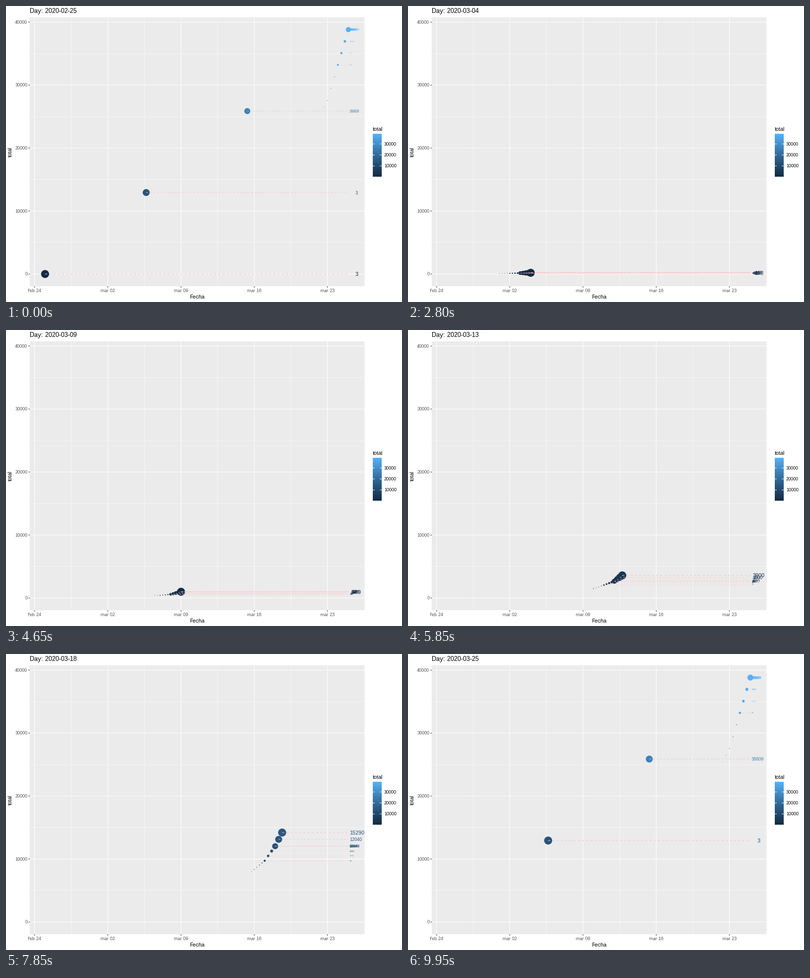
Animation of 800x600 px, one loop 10 s. Source, as a matplotlib script:

```python
import numpy as np
import matplotlib as mpl
import matplotlib.pyplot as plt
from matplotlib.animation import FuncAnimation
from matplotlib.collections import LineCollection
from matplotlib.patches import Rectangle

mpl.rcParams.update({
    "font.family": "Liberation Sans",
    "text.hinting": "default",
    "text.hinting_factor": 1,
    "lines.scale_dashes": False,
})

W, H, FRAMES, WAKE = 800, 600, 200, 20
LEFT, RIGHT, TOP, BOTTOM = 48.2, 724.5, 23, 568
DAY, LABEL_X = 21.13, 694
PT = 72.27 / 25.4

TOTALS = [3, 10, 18, 32, 45, 73, 114, 151, 198, 257,
          374, 430, 589, 999, 1501, 2060, 2677, 3900, 5232, 6948,
          8352, 9729, 12040, 15290, 17393, 21475, 24270, 27560, 33203, 38809]
LAST = len(TOTALS) - 1


def x_at(day):
    """Pixel column of a day counted from February 25."""
    return 78.9 + DAY * day


def y_at(total):
    return 543.3 - 0.012767 * total


# Colour gradient, mixed in CIE Lab
M = np.array([[0.4124, 0.3576, 0.1805],
              [0.2126, 0.7152, 0.0722],
              [0.0193, 0.1192, 0.9505]])
WHITE = M.sum(axis=1)


def to_lab(rgb):
    c = np.array(rgb) / 255
    lin = np.where(c > 0.04045, ((c + 0.055) / 1.055) ** 2.4, c / 12.92)
    t = M @ lin / WHITE
    x, y, z = np.where(t > 0.008856, np.cbrt(t), 7.787 * t + 16 / 116)
    return np.array([116 * y - 16, 500 * (x - y), 200 * (y - z)])


def to_rgb(lab):
    fy = (lab[0] + 16) / 116
    t = np.array([fy + lab[1] / 500, fy, fy - lab[2] / 200])
    xyz = np.where(t > 0.2069, t ** 3, (t - 16 / 116) / 7.787) * WHITE
    lin = np.clip(np.linalg.solve(M, xyz), 0, 1)
    c = np.where(lin > 0.0031308, 1.055 * lin ** (1 / 2.4) - 0.055, 12.92 * lin)
    return np.clip(c, 0, 1)


LOW, HIGH = to_lab((19, 43, 67)), to_lab((86, 177, 247))


def shade(total):
    u = (total - TOTALS[0]) / (TOTALS[-1] - TOTALS[0])
    return to_rgb(LOW + (HIGH - LOW) * u)


def day_name(i):
    return f"2020-02-{25 + i}" if i < 5 else f"2020-03-{i - 4:02d}"


def build_poses():
    """One (x, y, colour, label, title) per frame: hold a day, then glide on."""
    poses = []

    def add(i, nxt, u, title):
        total = TOTALS[i] + (TOTALS[nxt] - TOTALS[i]) * u
        label = str(TOTALS[i if u < 0.5 else nxt])
        poses.append((x_at(i + (nxt - i) * u), y_at(total), shade(total),
                      label, "Day: " + day_name(title)))

    for i in range(LAST + 1):
        nxt = (i + 1) % (LAST + 1)
        steps = 4 if i < 21 else 3
        for _ in range(3):
            add(i, i, 0, i)
        for j in range(1, steps + 1):
            add(i, nxt, j / steps, i if j <= (steps + 1) // 2 else nxt)
    return poses[:FRAMES]


poses = build_poses()

fig = plt.figure(figsize=(W / 72, H / 72), dpi=72, facecolor="white")
ax = fig.add_axes([0, 0, 1, 1])
ax.axis("off")


def rule(x0, y0, x1, y1, color="white", lw=1.07, z=1):
    ax.plot([x0, x1], [y0, y1], color=color, lw=lw, zorder=z,
            solid_capstyle="butt", snap=False)


def write(x, y, text, size, color="black", **kw):
    return ax.text(x, y, text, fontsize=size, color=color,
                   va=kw.pop("va", "baseline"), **kw)


# Panel, grid and axes
ax.add_patch(Rectangle((LEFT, TOP), RIGHT - LEFT, BOTTOM - TOP,
                       fc="#EBEBEB", ec="none", lw=0, zorder=0))
for k in range(5):
    x = x_at(7 * k - 1)
    rule(x + 3.5 * DAY, TOP, x + 3.5 * DAY, BOTTOM, lw=0.53)
    rule(x, TOP, x, BOTTOM)
    rule(x, BOTTOM, x, BOTTOM + 2.75, "#333333")
    name = ["feb 24", "mar 02", "mar 09", "mar 16", "mar 23"][k]
    write(x, 580, name, 8.8, "#4D4D4D", ha="center")

    y = y_at(10000 * k)
    if k < 4:
        rule(LEFT, y_at(10000 * k + 5000), RIGHT, y_at(10000 * k + 5000), lw=0.53)
    rule(LEFT, y, RIGHT, y)
    rule(LEFT - 2.75, y, LEFT, y, "#333333")
    write(43.2, y + 3.1, str(10000 * k), 8.8, "#4D4D4D", ha="right")

write((LEFT + RIGHT) / 2, 593, "Fecha", 11, ha="center")
write(9, (TOP + BOTTOM) / 2, "total", 11, rotation=90, ha="center", va="center")

# Colour legend
BAR_X, BAR_Y, BAR_W, BAR_H = 741.3, 260, 17.28, 86.4
ramp = np.array([[shade(v)] for v in np.linspace(TOTALS[-1], TOTALS[0], 87)])
ax.imshow(ramp, extent=(BAR_X, BAR_X + BAR_W, BAR_Y + BAR_H, BAR_Y),
          aspect="auto", interpolation="bilinear", zorder=1)
write(741, 253, "total", 11)
for v in (30000, 20000, 10000):
    y = BAR_Y + BAR_H * (TOTALS[-1] - v) / (TOTALS[-1] - TOTALS[0])
    rule(BAR_X, y, BAR_X + BAR_W / 5, y, z=2)
    rule(BAR_X + BAR_W * 0.8, y, BAR_X + BAR_W, y, z=2)
    write(764, y + 3.1, str(v), 8.8)

# Moving parts, oldest trace first
ages = np.arange(WAKE - 1, -1, -1)
scale = (1 - ages / WAKE) ** 3
widths = 0.5 * PT * scale
dashes = [(0, (3 * d, 3 * d)) for d in np.maximum(1, widths)]

title = write(LEFT, 14, "", 13)
dots = ax.scatter(np.zeros(WAKE), np.zeros(WAKE), s=(15.2 * scale + 1) ** 2,
                  linewidths=0, zorder=3)
dots.set_snap(False)
lines = LineCollection([[(0, 0), (1, 0)]] * WAKE, colors="#FFC0CB",
                       linewidths=0.75 * widths, linestyles=dashes, zorder=4)
lines.set_snap(False)
ax.add_collection(lines, autolim=False)
labels = [(k, write(0, 0, "", 11.04 * s, zorder=5))
          for k, s in enumerate(scale) if 11.04 * s > 1.3]

ax.set_xlim(0, W)
ax.set_ylim(H, 0)


def draw(frame):
    trail = [poses[(frame - age) % FRAMES] for age in ages]
    title.set_text(trail[-1][4])
    dots.set_offsets([p[:2] for p in trail])
    dots.set_facecolors([p[2] for p in trail])
    lines.set_segments([[(x, y), (x_at(LAST), y)] for x, y, *_ in trail])
    for k, text in labels:
        _, y, color, label, _ = trail[k]
        size = 11.04 * scale[k]
        # labels are padded on the left to five characters
        pad = (5 - len(label)) * round(0.278 * size)
        text.set_position((LABEL_X + pad, y + 0.36 * size))
        text.set_text(label)
        text.set_color(color)
    return [title, dots, lines] + [t for _, t in labels]


anim = FuncAnimation(fig, draw, frames=FRAMES, interval=50,
                     repeat=True, repeat_delay=0, blit=False)
plt.show()
```
